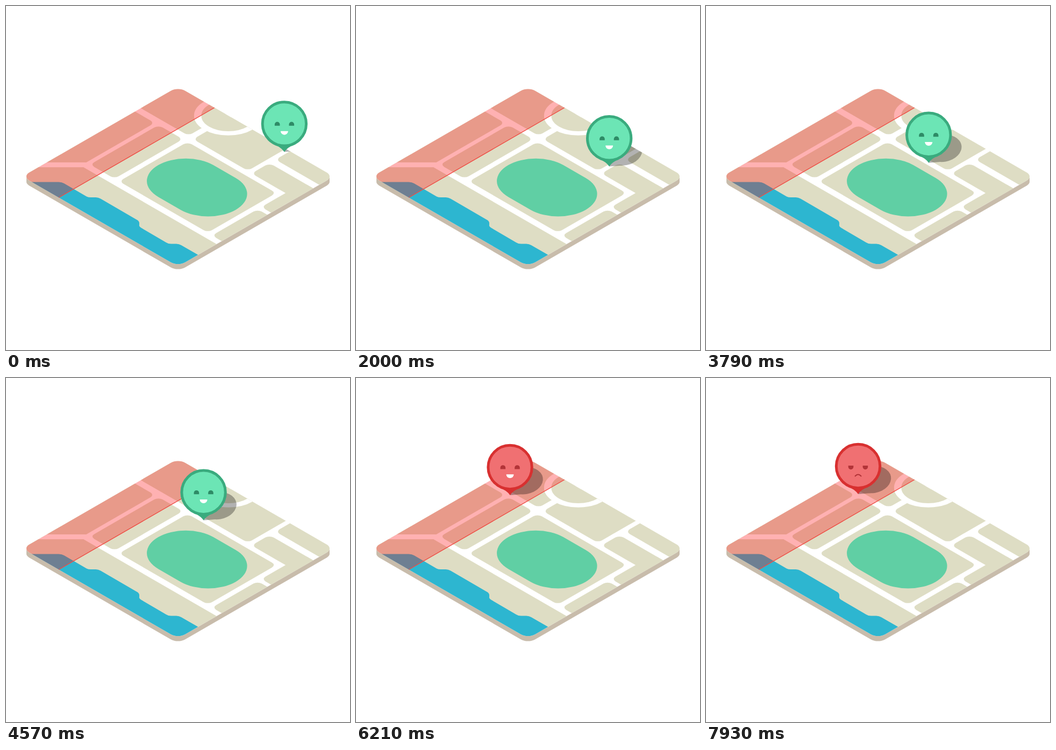
An HTML page for the animation above (8000 ms loop, 640x640 px).

```html
<!DOCTYPE html>
<html lang="en">
<head>
<meta charset="utf-8">
<title>Map pin</title>
<style>
  html, body { margin: 0; width: 100%; height: 100%; overflow: hidden; background: #fff; }
  svg { display: block; width: 100vw; height: 100vh; }
  .land { fill: #deddc4; }
  .land rect { rx: 9px; }
  .slab { fill: #c8bcab; }
  .pin { --fill: #6ce5b5; --edge: #3aab7e; --eye: #2e8b66; }
  .pin.danger { --fill: #f07072; --edge: #d83030; --eye: #b23438; }
  .tail { fill: var(--edge); }
  .head { fill: var(--fill); stroke: var(--edge); stroke-width: 5; }
  .eye { fill: var(--eye); }
  .frown { fill: none; stroke: var(--eye); stroke-width: 2; stroke-linecap: round; }
  .sad .happy-face, .pin:not(.sad) .sad-face { display: none; }
</style>
</head>
<body>
<svg viewBox="0 0 640 640">
  <defs>
    <rect id="plate" width="334.5" height="334.5" rx="15" transform="matrix(.866 .5 -.866 .5 320 150)"/>
    <clipPath id="top"><use href="#plate"/></clipPath>
  </defs>

  <g class="slab">
    <use href="#plate" y="9.5"/>
    <rect x="38" y="317.3" width="564" height="9.5"/>
  </g>

  <g clip-path="url(#top)">
    <rect width="640" height="640" fill="#fff"/>

    <!-- City blocks on the isometric ground plane -->
    <g class="land" transform="matrix(.866 .5 -.866 .5 320 150)">
      <rect x="-20" y="92.5" width="62.5" height="300"/>
      <rect x="50.5" y="92.5" width="52.5" height="147"/>
      <rect x="113" y="92.5" width="190.5" height="147"/>
      <rect x="-50" y="251.5" width="450" height="120"/>
      <rect x="-20" y="-20" width="122.5" height="100"/>
      <rect x="114" y="-20" width="117.5" height="101.5"/>
      <rect x="240.5" y="-20" width="120" height="51"/>
      <rect x="240.5" y="44" width="120" height="38.5"/>
      <rect x="313.5" y="44" width="50" height="90.5"/>
      <rect x="313.5" y="142.5" width="50" height="98"/>
      <circle cx="108" r="46.5" stroke="#fff" stroke-width="11"/>
      <rect x="124.8" y="108" width="166.4" height="118.4" style="rx: 59.2px" fill="#60cfa4"/>
    </g>
    <path stroke="#fff" stroke-width="9" d="M30 295.5H152"/>
    <path fill="#2db6d0" d="M40 327.5H98Q104 327.5 108 330L150 354.5Q153 356 158 356H167Q172 356 176 358.5L243 397.5Q248 400 248 404V407Q247 410 252 413L298 440Q302 442.5 307 442.5H317Q322 442.5 326 445L380 476V500H0Z"/>

    <g transform="matrix(.866 .5 -.866 .5 320 150)">
      <rect width="78.4" height="335" fill="#ff0508" fill-opacity=".31"/>
      <path stroke="#ee4e45" stroke-width="1.6" d="M78.4 0V335"/>
    </g>
    <g id="shadow" opacity=".3">
      <path d="M0 0L25 -2L5 -15Z"/>
      <ellipse rx="34" ry="25" transform="translate(27.5 -27) rotate(-10)"/>
    </g>
  </g>

  <g id="pin" class="pin">
    <path class="tail" d="M-18 -13Q-6 -9 0 0Q6 -9 18 -13Z"/>
    <g transform="translate(0 -52.1)">
      <circle class="head" r="40.7"/>
      <g class="happy-face">
        <path class="eye" d="M-18 3.5V1a4.8 4.8 0 0 1 9.6 0V3.5ZM8.6 3.5V1a4.8 4.8 0 0 1 9.6 0V3.5Z"/>
        <path fill="#fff" d="M-7 13.3H7A7 7 0 0 1 -7 13.3Z"/>
      </g>
      <g class="sad-face">
        <path class="eye" d="M-18.3 -1V1.5a4.8 4.8 0 0 0 9.6 0V-1ZM8.6 -1V1.5a4.8 4.8 0 0 0 9.6 0V-1Z"/>
        <path class="frown" d="M-5.5 18.5Q0 12.5 5.5 18.5"/>
      </g>
    </g>
  </g>
</svg>

<script>
const LOOP = 8000;
const RED_AT = 5530;
const SAD_AT = 7000;

const pin = document.getElementById('pin');
const shadow = document.getElementById('shadow');

const progress = (t, from, to) => Math.min(1, Math.max(0, (t - from) / (to - from)));
const ease = (t, from, to) => {
  const s = progress(t, from, to);
  return s * s * (3 - 2 * s);
};
// Rises from 0 to 1 and falls back within the span.
const pulse = (t, from, to) => Math.sin(Math.PI * progress(t, from, to)) ** 2;

// Ground plane to screen.
const project = (u, v) => [320 + 0.866 * (u - v), 150 + 0.5 * (u + v)];

function draw(t) {
  // One street after the other; the legs overlap a little at the corner.
  const u = 235.7 - 191 * ease(t, 2650, 6550);
  const v = 7.2 + 80.2 * ease(t, 514, 2923);
  const [x, y] = project(u, v);
  const lift = 4 * pulse(t, 360, 1000) + 9 * pulse(t, 6850, 7550);
  const dip = 5 * pulse(t, 6400, 7000);

  pin.setAttribute('transform', `translate(${x} ${y + dip - lift})`);
  shadow.setAttribute('transform', `translate(${x + lift * 0.35} ${y + dip - lift * 0.2})`);
  pin.classList.toggle('danger', t >= RED_AT);
  pin.classList.toggle('sad', t >= SAD_AT);
}

const start = performance.now();
function tick() {
  draw((performance.now() - start) % LOOP);
  requestAnimationFrame(tick);
}
tick();
</script>
</body>
</html>
```
